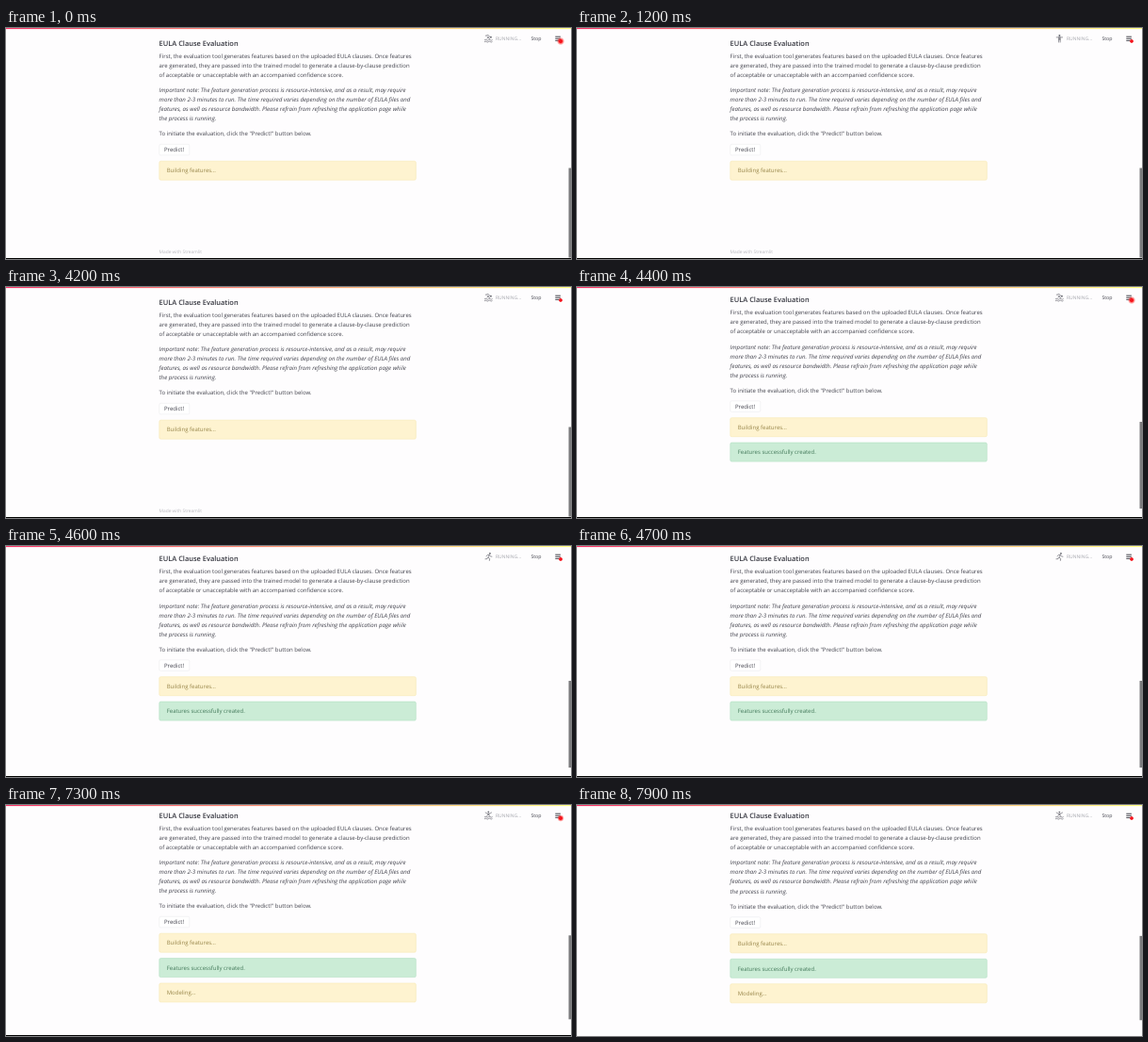
Animation of 600 by 245 pixels, one loop 8 s. Source, as an HTML page:

```html
<!DOCTYPE html>
<html lang="en">
<head>
<meta charset="utf-8">
<title>Clause evaluation</title>
<style>
  html, body { margin: 0; height: 100%; overflow: hidden; background: #fefdfe; }
  svg { display: block; width: 100vw; height: 100vh; }
  text { font: 6px "Open Sans", "Noto Sans", sans-serif; fill: #40414b; text-rendering: geometricPrecision; white-space: pre; }
  .title { font-size: 7.45px; font-weight: 600; fill: #33343d; }
  .note { font-style: italic; font-size: 6.15px; }
  .foot { font-size: 4.85px; fill: #b9b9bf; }
  .status { font-size: 5px; fill: #a3a4ab; }
  .stop { font-size: 5.2px; }
  #icons g { fill: none; stroke: #6a6b73; stroke-width: .7; stroke-linecap: round; stroke-linejoin: round; }
  #icons .head { fill: #6a6b73; stroke: none; }
</style>
</head>
<body>
<svg viewBox="0 0 600 245">
  <defs>
    <linearGradient id="bar">
      <stop stop-color="#f63366"/><stop offset="1" stop-color="#fffd80"/>
    </linearGradient>
    <radialGradient id="halo">
      <stop offset=".3" stop-color="#ff1010"/><stop offset="1" stop-color="#ff3030" stop-opacity="0"/>
    </radialGradient>
    <path id="waves" d="M508.3 12.7q1-1 2 0t2 0 2 0 2 0M508.3 14.6q1-1 2 0t2 0 2 0 2 0"/>
  </defs>
  <g id="screen">
    <g id="page">
      <rect x="162.8" y="123.3" width="32" height="11.6" rx="1.5" fill="#fff" stroke="#ebebee" stroke-width=".6"/>
      <text x="168" y="131.4">Predict!</text>
    </g>
    <text id="foot" class="foot" x="162.6" y="238.8">Made with Streamlit</text>
    <g id="icons">
      <g data-name="swim">
        <circle class="head" cx="514.9" cy="9.7" r=".95"/>
        <path d="M509.3 8.2l2.9-.7 1.3 1.8-2.5 1.6M511 9.2l2.7 2.4"/>
        <use href="#waves"/>
      </g>
      <g data-name="run">
        <circle class="head" cx="513.9" cy="7.9" r=".95"/>
        <path d="M510.1 10.7l1.4-1.4 1.9.3 1 1.4 1.5.2M513.2 9.7l-1.3 2.5 1.8 1.2-.3 2M511.9 12.2l-.9 1.4-2 .2"/>
      </g>
      <g data-name="stand">
        <circle class="head" cx="512.4" cy="7.9" r="1"/>
        <path d="M509.2 9.9h6.4M511.6 10v5M513.2 10v5M511.6 12.2h1.6M512.4 10v2"/>
      </g>
      <g data-name="wheelchair">
        <circle class="head" cx="513.7" cy="7.9" r=".95"/>
        <path d="M513.2 9.3l-1 2.5h2.4l1 2.8M513 10l-2.2-.3-.8 1.2M514.2 13.4a2.1 2.1 0 1 1-2.9-2.4"/>
      </g>
      <g data-name="bike">
        <circle class="head" cx="513.7" cy="7.7" r=".9"/>
        <circle cx="509.7" cy="13" r="2"/><circle cx="515.4" cy="13" r="2"/>
        <path d="M512.5 14.2v-1.9l-1.6-1.3 1.9-1.9 1.2 1.4h1.5"/>
      </g>
      <g data-name="row">
        <circle class="head" cx="512.3" cy="7.5" r=".9"/>
        <path d="M509.2 8l2.2 1.5h1.8l2.4-1.5M511.4 9.5l2.6 2.2M513.2 9.5l-2.6 2.2"/>
        <use href="#waves"/>
      </g>
    </g>
    <text class="status" x="520" y="13.3">RUNNING...</text>
    <text class="stop" x="557.4" y="13.2">Stop</text>
    <path d="M583.3 9.2h5.6m-5.6 2.1h5.6m-5.6 2.1h5.6" stroke="#33343d" stroke-width=".9"/>
    <circle id="glow" cx="589" cy="14" fill="url(#halo)"/>
    <circle cx="589" cy="14" r="1.8" fill="#f3121c"/>
    <rect id="thumb" x="597.5" width="2.5" fill="#7c7c7e"/>
    <rect width="600" height="1.1" fill="url(#bar)"/>
    <rect y="244" width="600" height="1"/>
  </g>
</svg>
<script>
const $ = id => document.getElementById(id);
const page = $("page");

function add(parent, tag, attrs, content = "") {
  const el = document.createElementNS("http://www.w3.org/2000/svg", tag);
  for (const key in attrs) el.setAttribute(key, attrs[key]);
  el.textContent = content;
  return parent.appendChild(el);
}

function lines(y, style, ...rows) {
  rows.forEach((row, i) => add(page, "text", { x: 162.6, y: y + i * 10.02, class: style }, row));
}

lines(18.7, "title", "EULA Clause Evaluation");
lines(31.8, "body",
  "First, the evaluation tool generates features based on the uploaded EULA clauses. Once features",
  "are generated, they are passed into the trained model to generate a clause-by-clause prediction",
  "of acceptable or unacceptable with an accompanied confidence score.");
lines(68.1, "note",
  "Important note: The feature generation process is resource-intensive, and as a result, may require",
  "more than 2-3 minutes to run. The time required varies depending on the number of EULA files and",
  "features, as well as resource bandwidth. Please refrain from refreshing the application page while",
  "the process is running.");
lines(114.3, "body", "To initiate the evaluation, click the \"Predict!\" button below.");

const yellow = ["#fef3d0", "#f7e7b2", "#978549"];
const green = ["#cbecd6", "#b1dfc2", "#43795a"];
const alerts = [
  ["Building features...", yellow],
  ["Features successfully created.", green],
  ["Modeling...", yellow],
].map(([label, [fill, stroke, ink]], i) => {
  const g = add(page, "g", {});
  const y = 141.2 + i * 26.4;
  add(g, "rect", { x: 162.8, y, width: 272.5, height: 20, rx: 1.5, fill, stroke, "stroke-width": .6 });
  add(g, "text", { x: 170.7, y: y + 12.2, style: `fill:${ink}` }, label);
  return g;
});

// Page states: [start s, scroll, thumb top, thumb height]
const states = [[0, 0, 148.5, 95], [4.4, -2.5, 143, 92], [5, -5, 138.3, 89]];
// Icon cycle: [end s, name]
const cycle = [[.35, "swim"], [1, "run"], [1.7, "stand"], [2.55, "wheelchair"], [3.2, "bike"], [3.85, "row"], [4.1, "swim"]];
const icons = [...$("icons").children];
const show = (el, on) => el.setAttribute("visibility", on ? "visible" : "hidden");

function draw(now) {
  const t = now / 1000 % 8;
  const step = states.filter(s => t >= s[0]).length - 1;
  const [, scroll, top, height] = states[step];
  page.setAttribute("transform", `translate(0 ${scroll})`);
  alerts.forEach((el, i) => show(el, i <= step));
  show($("foot"), step === 0);
  $("thumb").setAttribute("y", top);
  $("thumb").setAttribute("height", height);
  // The view finally grows to crop away the black bottom edge
  $("screen").setAttribute("transform", `scale(1 ${t < 7.7 ? 1 : 245 / 244})`);

  const name = cycle.find(([end]) => t % 4.1 < end)[1];
  icons.forEach(el => show(el, el.dataset.name === name));
  $("glow").setAttribute("r", 2.2 + 2 * Math.max(0, Math.cos(t * 2 * Math.PI / .7375)));
  requestAnimationFrame(draw);
}
draw(performance.now());
</script>
</body>
</html>
```
